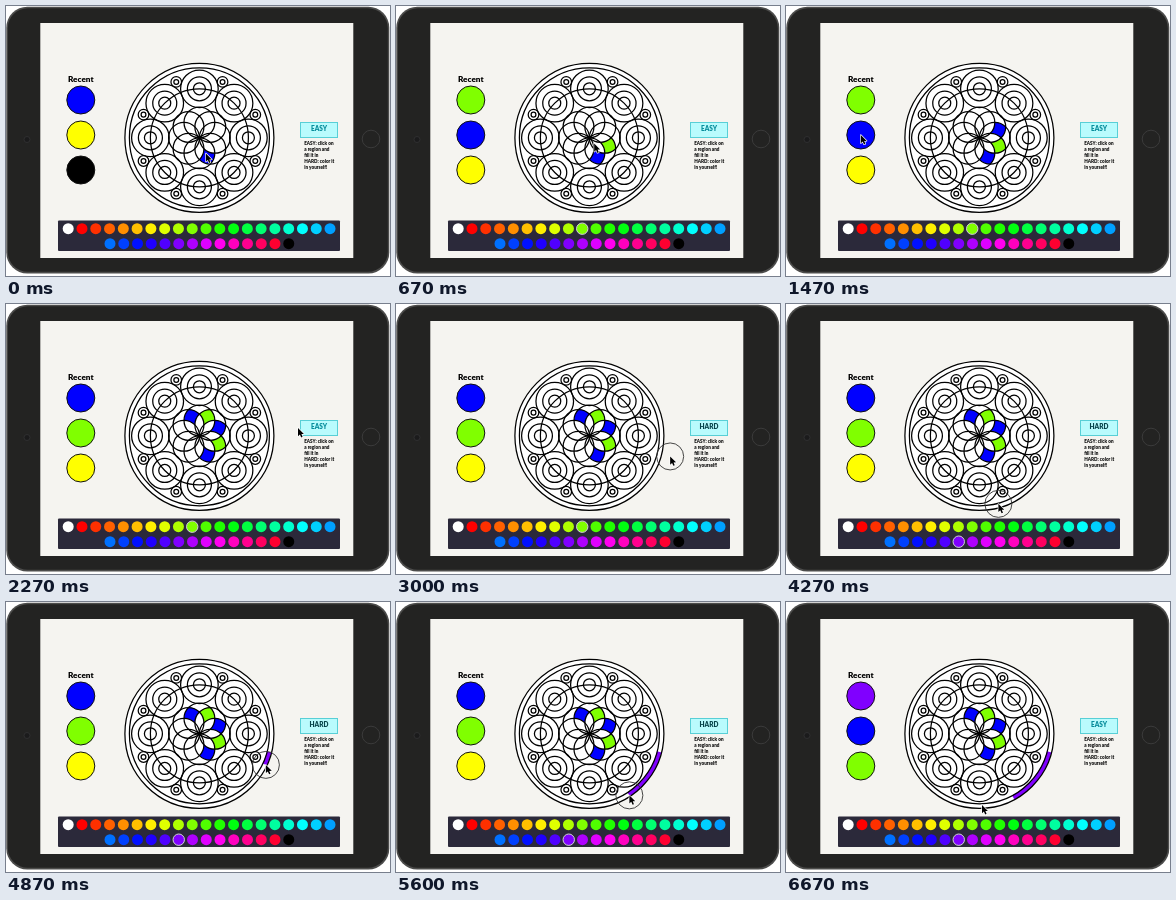
An HTML page with a canvas for the animation above (6.74 s loop, 384 by 270 pixels).

```html
<!DOCTYPE html>
<html lang="en">
<head>
<meta charset="utf-8">
<title>Mandala colouring</title>
<style>
html, body { margin: 0; width: 100%; height: 100%; overflow: hidden; background: #fff; }
canvas { display: block; width: 384px; height: 270px; }
</style>
</head>
<body>
<canvas id="stage"></canvas>
<script>
const W = 384, H = 270, LOOP = 6740, TAU = Math.PI * 2, DEG = Math.PI / 180;
const CX = 193.4, CY = 131.8, PETAL = 15.4, BRUSH = 73.4;
const DRAW_START = 4630, DRAW_END = 5715, ANGLE_START = 14.5, ANGLE_END = 62;
const INK = '#000', BLUE = '#0000ff', YELLOW = '#ffff00';

const canvas = document.getElementById('stage');
const ctx = canvas.getContext('2d');
const dpr = window.devicePixelRatio || 1;
canvas.width = W * dpr;
canvas.height = H * dpr;

const clamp = v => Math.max(0, Math.min(1, v));
const polar = (r, deg) => [CX + r * Math.cos(deg * DEG), CY + r * Math.sin(deg * DEG)];
const petalAngle = i => 67.5 - 45 * i;
const slotPos = i => [74.8, 94 + 35 * i];
const swatchPos = i => i < 20 ? [62.2 + i * 13.78, 222.7] : [104 + (i - 20) * 13.75, 237.7];
const swatchColor = i => i === 0 ? '#fff' : i === 33 ? INK : `hsl(${(i - 1) * 11.25}, 100%, 50%)`;
const strokeAngle = t =>
  ANGLE_START + (ANGLE_END - ANGLE_START) * clamp((t - DRAW_START) / (DRAW_END - DRAW_START));

// What each kind of step does to the app state
const effects = {
  petal(s, i) { s.fills.push([i, s.color]); promote(s, s.color); },
  swatch(s, i) { s.pick = i; s.color = swatchColor(i); },
  slot(s, i) { s.color = s.recents[i]; promote(s, s.color); },
  toggle(s) { s.hard = !s.hard; },
  lift(s) { promote(s, s.color); }
};

const step = (time, kind, pos, arg) => ({ time, kind, pos, arg });
const petal = (time, i) => step(time, 'petal', polar(17, petalAngle(i)), i);
const swatch = (time, i) => step(time, 'swatch', swatchPos(i), i);
const slot = (time, i) => step(time, 'slot', slotPos(i), i);
const toggle = time => step(time, 'toggle', [308, 124]);
const move = (time, x, y) => step(time, 'move', [x, y]);

const steps = [
  petal(0, 0), swatch(350, 9), petal(580, 1),
  slot(840, 1), petal(1130, 2),
  slot(1450, 1), petal(1690, 3),
  slot(1900, 1), petal(2080, 4),
  move(2290, 292, 124), toggle(2500), swatch(3960, 25),
  step(DRAW_START, 'press', polar(BRUSH, ANGLE_START)),
  step(DRAW_END, 'lift', polar(BRUSH, ANGLE_END)),
  move(5900, 345, 114), toggle(6060), move(6530, 225, 218), move(LOOP, 196, 203)
];

function promote(s, color) {
  s.recents = [color, ...s.recents.filter(c => c !== color)].slice(0, 3);
}

function stateAt(t) {
  const s = { color: BLUE, recents: [BLUE, YELLOW, INK], fills: [], pick: -1, hard: false };
  for (const { time, kind, arg } of steps) {
    if (time <= t && effects[kind]) effects[kind](s, arg);
  }
  return s;
}

function pointerAt(t) {
  if (t >= DRAW_START && t < DRAW_END) return polar(BRUSH, strokeAngle(t));
  const next = steps.findIndex(s => s.time > t);
  const a = steps[next - 1], b = steps[next];
  const gap = b.time - a.time, dwell = Math.min(70, gap / 3);
  const u = clamp((t - a.time - dwell) / (gap - 2 * dwell));
  const e = u * u * (3 - 2 * u);
  return a.pos.map((v, i) => v + (b.pos[i] - v) * e);
}

function disc(x, y, r, fill, line, width = 1) {
  ctx.beginPath();
  ctx.arc(x, y, r, 0, TAU);
  if (fill) { ctx.fillStyle = fill; ctx.fill(); }
  if (line) { ctx.strokeStyle = line; ctx.lineWidth = width; ctx.stroke(); }
}

function box(x, y, w, h, r, fill) {
  ctx.beginPath();
  ctx.roundRect(x, y, w, h, r);
  ctx.fillStyle = fill;
  ctx.fill();
}

function label(text, x, y, size, color, align = 'left') {
  ctx.font = `900 ${size}px Lato, sans-serif`;
  ctx.fillStyle = color;
  ctx.textAlign = align;
  ctx.fillText(text, x, y);
}

function drawTablet() {
  box(0, 0, W, H, 0, '#fff');
  box(0.3, 0.7, W - 1, 266.8, 21, '#4c4c4b');
  box(1.8, 2.2, W - 4, 263.6, 20, '#232322');
  disc(21, 133.5, 3, '#1b1b1c', '#343435', 0.8);
  disc(365, 133, 8.8, null, '#3b3b3b', 1);
  box(34.3, 17, 313, 235, 0, '#f5f4f0');
}

// One cell where two neighbouring flower circles overlap
function fillPetal(angle, color) {
  ctx.beginPath();
  const add = (d, r) => ctx.lineTo(...polar(r, angle + d));
  for (let d = -22.5; d <= 22.5; d += 1.5) add(d, 2 * PETAL * Math.cos((22.5 + Math.abs(d)) * DEG));
  for (let d = 22.5; d >= -22.5; d -= 1.5) add(d, 2 * PETAL * Math.cos((67.5 - Math.abs(d)) * DEG));
  ctx.fillStyle = color;
  ctx.fill();
}

function rings(dist, angle, ...radii) {
  for (const r of radii) disc(...polar(dist, angle), r, null, INK, 1.25);
}

function drawMandala(t, s) {
  disc(CX, CY, 74.5, '#fff');
  for (const [i, color] of s.fills) fillPetal(petalAngle(i), color);
  if (t > DRAW_START) {
    ctx.beginPath();
    ctx.arc(CX, CY, 72.2, ANGLE_START * DEG, strokeAngle(t) * DEG);
    ctx.strokeStyle = swatchColor(25);
    ctx.lineWidth = 4.6;
    ctx.stroke();
  }
  rings(0, 0, 74.5, 70, 49);
  for (let a = 0; a < 360; a += 45) {
    rings(PETAL, a, PETAL);
    rings(49, a, 18.8, 12, 6);
    rings(60.5, a + 22.5, 5.3, 2.4);
  }
}

function drawPalette(s) {
  box(52, 214.5, 282, 30.5, 1, '#2b293a');
  for (let i = 0; i < 34; i++) {
    disc(...swatchPos(i), 5.5, swatchColor(i));
    if (i === s.pick) disc(...swatchPos(i), 5.7, null, '#e8e4f0', 0.9);
  }
}

function drawSide(s) {
  label('Recent', 62, 75.8, 8.2, INK);
  s.recents.forEach((c, i) => disc(...slotPos(i), 14, c, '#111', 1));

  box(294, 116, 38, 16, 0, '#58cfd6');
  box(295, 117, 36, 14, 0, '#b9fbfd');
  label(s.hard ? 'HARD' : 'EASY', 313, 125.2, 6.5, s.hard ? '#06434a' : '#078c9b', 'center');

  ['EASY: click on', 'a region and', 'fill it in', 'HARD: color it', 'in yourself!']
    .forEach((line, i) => label(line, 298.2, 139.1 + 6 * i, 4.6, '#111'));
}

function drawPointer(t, s) {
  const [x, y] = pointerAt(t);
  if (s.hard && y < 212) disc(x, y, 13.5, null, '#333', 0.9);
  ctx.beginPath();
  [[0, 0], [0, 8.2], [1.9, 6.5], [3.2, 9.4], [4.6, 8.8], [3.4, 6], [5.9, 5.9]]
    .forEach(([dx, dy]) => ctx.lineTo(x + dx, y + dy));
  ctx.closePath();
  ctx.lineJoin = 'round';
  ctx.strokeStyle = '#fff';
  ctx.lineWidth = 1.3;
  ctx.stroke();
  ctx.fillStyle = INK;
  ctx.fill();
}

function draw(t) {
  const s = stateAt(t);
  ctx.setTransform(dpr, 0, 0, dpr, 0, 0);
  drawTablet();
  drawMandala(t, s);
  drawPalette(s);
  drawSide(s);
  drawPointer(t, s);
}

const start = performance.now();
function tick() {
  draw((performance.now() - start) % LOOP);
  requestAnimationFrame(tick);
}
tick();
</script>
</body>
</html>
```
